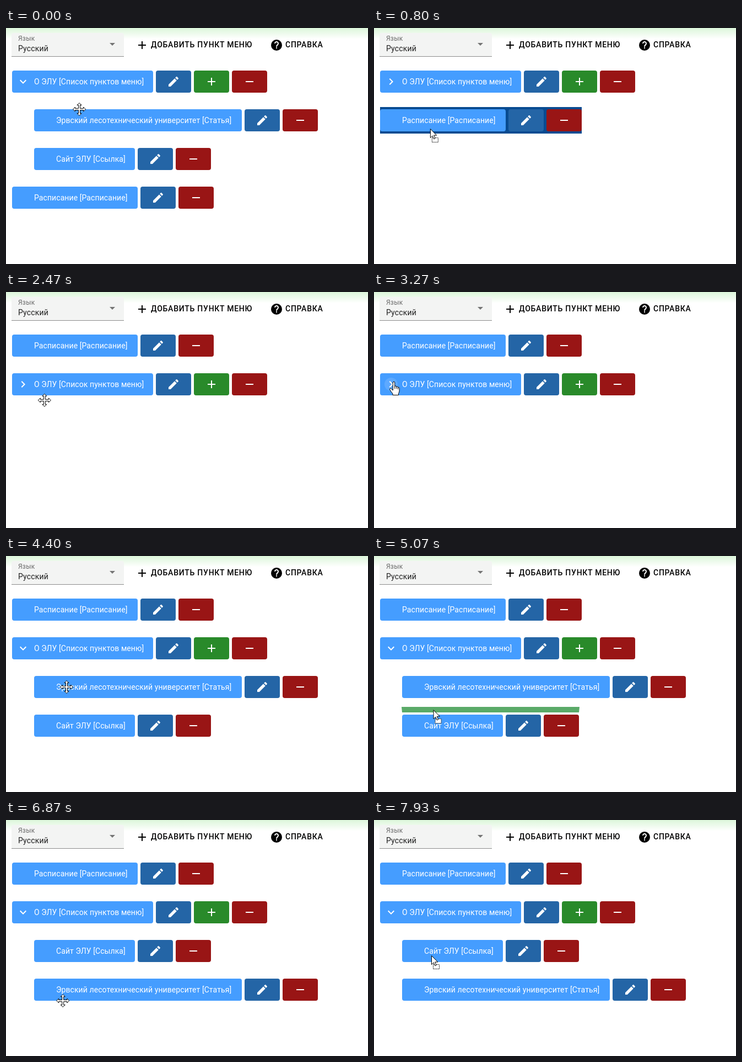
An HTML page that plays this animation: 657x427 px, repeating every 8 s.

```html
<!DOCTYPE html>
<html lang="ru">
<head>
<meta charset="utf-8">
<title>Редактор меню</title>
<style>
  html, body { margin: 0; width: 100%; height: 100%; overflow: hidden; background: #fff; }
  svg { display: block; font: 14px Roboto, sans-serif; }
  .row text { fill: #fff; letter-spacing: .08px; }
  .tool { font-weight: 500; letter-spacing: .75px; }
  .cursor { fill: #fff; stroke: #000; stroke-width: 1; stroke-linejoin: round; }
</style>
</head>
<body>
<svg id="stage" width="657" height="427" viewBox="0 0 657 427">
  <defs>
    <linearGradient id="glow" x2="0" y2="1">
      <stop stop-color="#dcf6da"/><stop offset="1" stop-color="#fff"/>
    </linearGradient>
    <path id="add" d="M19 13h-6v6h-2v-6H5v-2h6V5h2v6h6z"/>
    <path id="remove" d="M5 11h14v2H5z"/>
    <path id="edit" d="M3 17.25V21h3.75L17.81 9.94l-3.75-3.75zM20.71 7.04c.39-.39.39-1.02 0-1.41l-2.34-2.34c-.39-.39-1.02-.39-1.41 0l-1.83 1.83 3.75 3.75z"/>
    <path id="open" d="M16.59 8.59L12 13.17 7.41 8.59 6 10l6 6 6-6z"/>
    <path id="closed" d="M10 6L8.59 7.41 13.17 12l-4.58 4.58L10 18l6-6z"/>
  </defs>

  <rect width="657" height="20" fill="url(#glow)"/>
  <path d="M10 52V13a4 4 0 0 1 4-4H210a4 4 0 0 1 4 4V52z" fill="#f3f4f3"/>
  <path d="M10 51.5H214" stroke="#8c8c8c"/>
  <text x="22" y="23" font-size="12" letter-spacing=".2" fill="#6b6b6b">Язык</text>
  <text x="22" y="42" letter-spacing=".15" fill="#1f1f1f">Русский</text>
  <path d="M188 27h10l-5 5z" fill="#757575"/>
  <use href="#add" x="235" y="19"/>
  <text class="tool" x="263" y="35">ДОБАВИТЬ ПУНКТ МЕНЮ</text>
  <circle cx="491" cy="31" r="10"/>
  <path d="M488 29a3 3 0 1 1 5.2 2C492 32.2 491 32.800 491 35M491 36v2" transform="translate(0 -1)" fill="none" stroke="#fff" stroke-width="2"/>
  <text class="tool" x="507" y="35">СПРАВКА</text>

  <g id="marker"></g>
  <g id="rows"></g>
  <circle id="hover" cx="31" cy="167" r="12" fill="#fff" fill-opacity=".13"/>
  <circle id="ripple" cx="31" cy="167" fill="#fff"/>

  <g class="cursor">
    <path id="move" d="M0-11.500l4 4H1.500v6h6V-4l4 4-4 4V1.500h-6v6H4l-4 4-4-4h2.500v-6h-6V4l-4-4 4-4v2.500h6v-6H-4z"/>
    <g id="drag">
      <rect x="3.500" y="16.500" width="11" height="8" stroke-dasharray="1.500 1"/>
      <path d="M.5.500V16.500l3.700-3.500 2.500 5.700 2.500-1.100-2.500-5.600h5.100z"/>
    </g>
    <path id="hand" d="M-1.700 14V2a1.700 1.700 0 0 1 3.400 0V9a1.600 1.600 0 0 1 3 0v1a1.600 1.600 0 0 1 2.800 0v1a1.400 1.400 0 0 1 2.500 1V17q0 2-1.500 4.500V24.500H-2V22Q-5.500 18-7 15q-1-2 .5-2.700t2.800 1.700l2 2zM1.700 9v4M4.700 10v3M7.500 11v3"/>
  </g>
</svg>
<script>
const LOOP = 8000, TOP = 77, PITCH = 70, GAP = 5, BUTTON = 64;
const $ = id => document.getElementById(id);
const colors = { edit: '#2465a6', add: '#298a2a', remove: '#991515' };

const items = {
  list: { x: 11, width: 256, label: 'О ЭЛУ [Список пунктов меню]', buttons: ['edit', 'add', 'remove'] },
  article: { x: 51, width: 377, label: 'Эрвский лесотехнический университет [Статья]', buttons: ['edit', 'remove'] },
  link: { x: 51, width: 183, label: 'Сайт ЭЛУ [Ссылка]', buttons: ['edit', 'remove'] },
  schedule: { x: 11, width: 228, label: 'Расписание [Расписание]', buttons: ['edit', 'remove'] }
};

// Start time and visible order, top to bottom.
const orders = [
  [0, ['list', 'article', 'link', 'schedule']],
  [430, ['list', 'schedule']],
  [2130, ['schedule', 'list']],
  [3470, ['schedule', 'list', 'article', 'link']],
  [6330, ['schedule', 'list', 'link', 'article']]
];

// Start time, drop position and target row.
const drops = [
  [0], [600, 'before', 'schedule'], [670, 'inside', 'schedule'], [870, 'after', 'schedule'], [2130],
  [5000, 'before', 'link'], [5200, 'inside', 'link'], [5730, 'after', 'link'], [6330]
];

// Time, x, y, and the pointer used from then on.
const path = [
  [0, 133, 147, 'move'], [70, 133, 147, 'move'], [330, 116, 99, 'move'], [430, 114, 97, 'drag'],
  [600, 109, 130, 'drag'], [800, 102, 182, 'drag'], [870, 92, 191, 'drag'],
  [1200, 78, 228, 'drag'], [1450, 63, 218, 'drag'], [1730, 72, 198, 'drag'],
  [2130, 72, 198, 'move'], [2420, 72, 198, 'move'], [3130, 42, 168, 'move'], [3269, 42, 168, 'move'],
  [3270, 36, 162, 'hand'], [3600, 36, 163, 'hand'], [3700, 46, 180, 'move'],
  [4070, 96, 232, 'move'], [4400, 110, 237, 'move'], [4600, 110, 237, 'drag'],
  [4930, 109, 266, 'drag'], [5000, 108, 273, 'drag'], [5800, 103, 332, 'drag'], [5930, 102, 334, 'drag'],
  [6330, 102, 334, 'move'], [6740, 102, 334, 'move'], [6800, 103, 338, 'move'],
  [7470, 105, 234, 'move'], [7740, 105, 234, 'move'], [7800, 105, 236, 'drag'],
  [7930, 104, 245, 'drag'], [LOOP, 104, 245, 'drag']
];

const lastAt = (list, t) => list.findLast(entry => entry[0] <= t);
const show = (node, visible) => node.setAttribute('display', visible ? 'inline' : 'none');
const place = (node, x, y) => node.setAttribute('transform', `translate(${x} ${y})`);
const box = (x, width, color) => `<rect x="${x}" width="${width}" height="40" rx="4" fill="${color}"/>`;
const icon = (name, x) => `<use href="#${name}" x="${x - 12}" y="8" fill="#fff"/>`;

function buildRow(item, id) {
  let x = item.x + item.width + GAP;
  let parts = box(item.x, item.width, '#459dff') + `<text x="${item.x + 40}" y="25">${item.label}</text>`;
  for (const name of item.buttons) {
    parts += box(x, BUTTON, colors[name]) + icon(name, x + BUTTON / 2);
    x += BUTTON + GAP;
  }
  item.right = x - GAP;
  if (id === 'list') parts += icon('open', 31).replace('<use', '<use id="chevron"');
  return `<g class="row" id="${id}">${parts}</g>`;
}

function markerShape(position, item, y) {
  const { x, right } = item;
  if (position === 'inside')
    return `<path d="M${x} ${y - 4}H${right}v48H${x}z" fill="#084b91"/>`;
  const top = position === 'before' ? y - 14 : y + 44;
  return `<path d="M${x - 1} ${top}H${right + 1}l-1 10H${x}z" fill="#5aaa68"/>`;
}

function draw(t) {
  const order = lastAt(orders, t)[1];
  const rowY = id => TOP + PITCH * order.indexOf(id);
  for (const id in items) {
    show($(id), order.includes(id));
    place($(id), 0, rowY(id));
  }
  $('chevron').setAttribute('href', order.includes('article') ? '#open' : '#closed');

  const [, position, target] = lastAt(drops, t);
  $('marker').innerHTML = target ? markerShape(position, items[target], rowY(target)) : '';

  show($('hover'), t >= 3270 && t < 3700);
  const spread = (t - 3400) / 400;
  show($('ripple'), spread > 0 && spread < 1);
  $('ripple').setAttribute('r', 12 + 8 * Math.min(1, Math.max(0, spread * 2)));
  $('ripple').setAttribute('opacity', .2 * (1 - spread));

  const from = lastAt(path, t), to = path[path.indexOf(from) + 1];
  const k = (t - from[0]) / (to[0] - from[0]);
  for (const kind of ['move', 'drag', 'hand']) {
    show($(kind), kind === from[3]);
    place($(kind), from[1] + (to[1] - from[1]) * k, from[2] + (to[2] - from[2]) * k);
  }
}

$('rows').innerHTML = Object.entries(items).map(([id, item]) => buildRow(item, id)).join('');
const start = performance.now();
function tick() {
  draw((performance.now() - start) % LOOP);
  requestAnimationFrame(tick);
}
tick();
</script>
</body>
</html>
```
